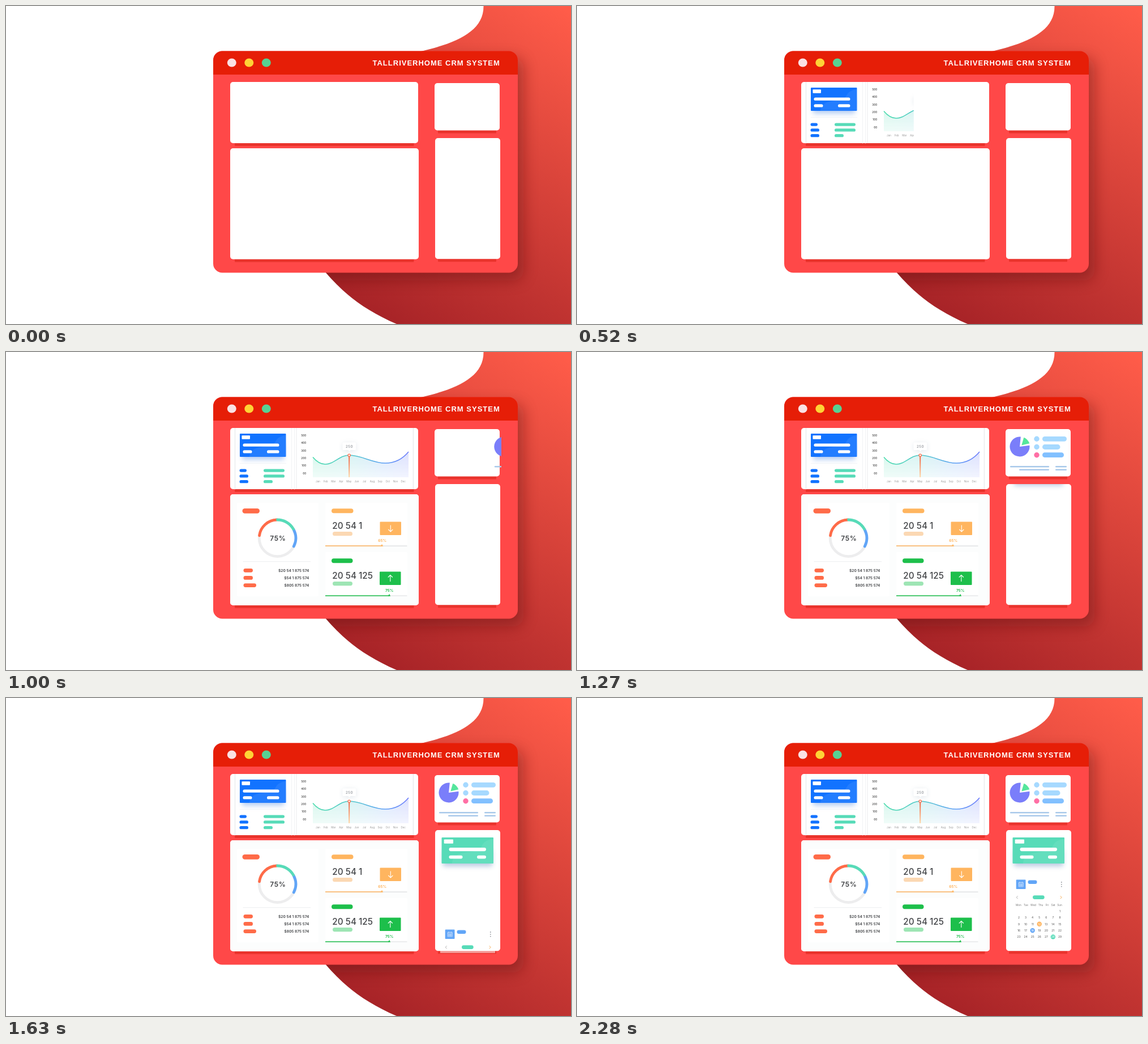
Write an HTML page that moves like this. It is 998x561 px and loops after 2980 ms.

```html
<!DOCTYPE html>
<html lang="en">
<head>
<meta charset="utf-8">
<title>Dashboard</title>
<style>
html, body { margin: 0; width: 100%; height: 100%; overflow: hidden; background: #fff; }
svg { display: block; width: 998px; height: 561px; }
text { font-family: Inter, "Open Sans", sans-serif; white-space: pre; }
</style>
</head>
<body>
<svg viewBox="0 0 998 561" xmlns="http://www.w3.org/2000/svg">
  <defs>
    <linearGradient id="red" gradientUnits="userSpaceOnUse" x1="980" y1="0" x2="640" y2="540">
      <stop offset="0" stop-color="#ff5c49"/><stop offset="1" stop-color="#a72327"/>
    </linearGradient>
    <linearGradient id="stroke" gradientUnits="userSpaceOnUse" x1="542" y1="0" x2="711" y2="0">
      <stop offset="0" stop-color="#4edcae"/><stop offset=".45" stop-color="#52c4cf"/>
      <stop offset=".75" stop-color="#5a9df5"/><stop offset="1" stop-color="#6f7dfa"/>
    </linearGradient>
    <linearGradient id="fade" x1="0" y1="0" x2="0" y2="1">
      <stop offset="0" stop-color="#fff"/><stop offset="1" stop-color="#fff" stop-opacity=".35"/>
    </linearGradient>
    <linearGradient id="stem" gradientUnits="userSpaceOnUse" x1="0" y1="184" x2="0" y2="221">
      <stop offset="0" stop-color="#f2603f"/><stop offset="1" stop-color="#ffd9a8"/>
    </linearGradient>
    <filter id="soft" x="-30%" y="-60%" width="160%" height="220%"><feGaussianBlur stdDeviation="4"/></filter>
    <filter id="wide" x="-20%" y="-20%" width="140%" height="140%"><feGaussianBlur stdDeviation="13"/></filter>
    <mask id="areaMask"><rect x="540" y="174" width="174" height="48" fill="url(#fade)"/></mask>
    <clipPath id="blobClip"><use href="#blob"/></clipPath>
    <clipPath id="topClip"><rect x="396" y="134" width="332" height="108.5" rx="5"/></clipPath>
    <clipPath id="wipeClip"><rect id="wipe" x="510" y="134" width="0" height="108"/></clipPath>
    <clipPath id="pieClip"><rect x="757" y="136" width="118" height="84"/></clipPath>
    <clipPath id="sideClip"><rect x="758" y="233" width="115" height="217"/></clipPath>
  </defs>
  <path id="blob" fill="url(#red)" d="M843.500 0C844 44 797 65 733 80L540 300L565 470.500C597 508 634 537 690 561H998V0Z"/>
  <g clip-path="url(#blobClip)">
    <rect x="376" y="92" width="538" height="392" rx="16" fill="#5a0808" opacity=".4" filter="url(#wide)"/>
  </g>
  <g id="shell"></g>
  <g clip-path="url(#topClip)"><g id="wallet"></g></g>
  <g clip-path="url(#wipeClip)"><g id="chart"></g></g>
  <g id="stats"></g>
  <g clip-path="url(#pieClip)"><g id="pie"></g></g>
  <g clip-path="url(#sideClip)"><g id="pass"></g><g id="calendar"></g></g>
</svg>
<script>
const $ = id => document.getElementById(id);
const ORANGE = '#ff6b48', AMBER = '#ffb55f', MINT = '#57dbb8', BLUE = '#61a5f7', GREEN = '#1dbf4b';

// Shape helpers; boxes are given by their edges.
const box = (x1, y1, x2, y2, fill, r = 0, more = '') =>
  `<rect x="${x1}" y="${y1}" width="${x2 - x1}" height="${y2 - y1}" rx="${r}" fill="${fill}" ${more}/>`;
const pill = (x1, y1, x2, y2, fill) => box(x1, y1, x2, y2, fill, (y2 - y1) / 2);
const disc = (x, y, r, fill, more = '') => `<circle cx="${x}" cy="${y}" r="${r}" fill="${fill}" ${more}/>`;
const line = (d, color, w, more = '') => `<path d="${d}" fill="none" stroke="${color}" stroke-width="${w}" ${more}/>`;
const label = (s, x, y, size, fill, weight = 400, anchor = 'middle', more = '') =>
  `<text x="${x}" y="${y}" font-size="${size}" fill="${fill}" font-weight="${weight}" text-anchor="${anchor}" ${more}>${s}</text>`;

function arc(cx, cy, r, from, to) {
  const at = deg => {
    const a = (deg - 90) * Math.PI / 180;
    return `${cx + r * Math.cos(a)} ${cy + r * Math.sin(a)}`;
  };
  return `M${at(from)}A${r} ${r} 0 ${to - from > 180 ? 1 : 0} 1 ${at(to)}`;
}

function panel(x1, y1, x2, y2, s1, s2) {
  return box(s1, y2 - 3, s2, y2 + 5, '#e9332c', 1) + box(x1, y1, x2, y2, '#fff', 5);
}

function drawShell() {
  const dots = ['#fae1e3', '#ffd336', '#57d193'];
  return box(366, 79.5, 904, 470.5, '#ff4848', 16) +
    '<path d="M366 121V95.500a16 16 0 0 1 16-16H888a16 16 0 0 1 16 16V121Z" fill="#e61e07"/>' +
    dots.map((c, i) => `<ellipse cx="${398.800 + i * 30.500}" cy="100" rx="8" ry="7.500" fill="${c}"/>`).join('') +
    label('TALLRIVERHOME CRM SYSTEM', 647.5, 105.3, 13, '#fff', 700, 'start',
      'letter-spacing="1" style="font-family:\'Liberation Sans\',Arial,sans-serif"') +
    panel(396, 134, 728, 242, 404, 720.5) +
    panel(396, 251, 729, 446.7, 404, 720.5) +
    panel(757, 136, 872, 219.5, 763, 866) +
    panel(758, 233, 873, 446.3, 763, 866);
}

function drawWallet() {
  const rows = [[425, 492], [428, 492], [428, 471]];
  return line('M404.500 134V243', '#dcdfe2', .8) +
    line('M504.500 134V243M509.500 134V243', '#f1f2f4', 1) +
    box(417, 162, 491, 190, '#6f9fe8', 3, 'opacity=".5" filter="url(#soft)"') +
    line('M413 196.500H495', '#f0f2f5', .8) +
    box(413, 144, 494.5, 185, '#1273ff', 1) +
    '<path d="M430 185C432 160 470 172 476 158C480 150 487 148 494.500 147V185Z" fill="#fff" opacity=".07"/>' +
    box(416.5, 147.3, 431, 153.7, '#fff', 1) +
    pill(418.5, 161.5, 482.5, 166.8, '#fff') +
    pill(418.5, 173.3, 434.5, 178.5, '#fff') + pill(461, 173.3, 482.5, 178.5, '#fff') +
    rows.map(([a, b], i) => {
      const y = 206.5 + i * 9.8;
      return pill(412.5, y, a, y + 5.2, '#1273ff') + pill(455, y, b, y + 5.2, MINT);
    }).join('');
}

function drawChart() {
  const months = 'Jan Feb Mar Apr May Jun Jul Aug Sep Oct Nov Dec'.split(' ');
  const curve = 'M542 185.500C549 194 556 198 564 198C580 198 589 182 606 182C628 182 647 196 670 196C690 196 702 187 711 176';
  return line('M513 134V242', '#e5e6e8', .8) + line('M719.300 134V242', '#dcdee0', .8) +
    ['500', '400', '300', '200', '100', '00'].map((s, i) =>
      label(s, 530.3, 149 + i * 13.35, 4.7, '#333', 500, 'end')).join('') +
    `<path d="${curve}V221H542Z" fill="url(#stroke)" opacity=".24" mask="url(#areaMask)"/>` +
    line('M606.200 184V221', 'url(#stem)', 2) +
    line(curve, 'url(#stroke)', 1.6) +
    disc(606.2, 182.2, 2.1, '#fff', `stroke="${ORANGE}" stroke-width="1.300"`) +
    box(595, 161, 618, 175, '#8fa4b8', 2, 'opacity=".25" filter="url(#soft)"') +
    box(594.5, 159.5, 618, 173, '#fff', 1.5) + '<path d="M604 172.500h5l-2.500 3z" fill="#fff"/>' +
    label('250', 606.5, 169, 6, '#a5a8ad', 700, 'middle', 'letter-spacing=".400"') +
    months.map((m, i) => label(m, 551 + i * 13.7, 230.4, 4.5, '#999')).join('');
}

function drawCounter(y, c) {
  const { color, pale, value, share, at, left, arrow } = c;
  const mid = left + 18.8;
  const tip = arrow > 0 ? y + 40.7 : y + 29.3;
  return pill(575, y, c.end, y + 8, color) +
    label(value, 576.3, y + 35.6, 15.3, '#424447', 500, 'start') +
    pill(577, y + 40.8, 612, y + 48, pale) +
    box(left, y + 23.2, left + 37.5, y + 46.8, color, 1) +
    line(`M${mid} ${y + 29.200}V${y + 40.800}M${mid - 4} ${tip - arrow * 4}L${mid} ${tip}L${mid + 4} ${tip - arrow * 4}`, '#fff', 1.1) +
    label(share, c.shareX, y + 58.5, 6.5, color, 700) +
    line(`M564 ${y + 65.800}H708.500`, '#d9dbdd', 1.2) + line(`M564 ${y + 65.800}H${at}`, color, 1.5) +
    `<path d="M${at - 2.200} ${y + 66.500}l2.200-4 2.200 4z" fill="${color}"/>`;
}

function drawStats() {
  const ring = [[-82, -2, ORANGE], [62, 117, BLUE], [0, 60, MINT]];
  const sums = [[436, '$20 54 1 875 574'], [436, '$54 1 875 574'], [442, '$805 875 574']];
  return box(396, 251, 729, 446.7, '#fcfdfd', 5) +
    box(408, 266, 551.5, 431, '#fff', 2) + box(564, 266, 709, 343, '#fff', 2) + box(564, 353, 709, 431, '#fff', 2) +
    pill(417.5, 276, 448, 284.7, ORANGE) +
    disc(479.5, 328.3, 32.3, 'none', 'stroke="#ededee" stroke-width="4.800"') +
    ring.map(([a, b, c]) => line(arc(479.5, 328.3, 32.3, a, b), c, 4.8, 'stroke-linecap="round"')).join('') +
    label('75%', 480.3, 332.6, 12, '#3f4144', 600, 'middle', 'letter-spacing=".700"') +
    line('M418.500 369.700H538', '#e6e8ea', .8) +
    sums.map(([end, s], i) => {
      const y = 382 + i * 13.1;
      return pill(419.5, y, end, y + 6.7, ORANGE) + label(s, 535.5, y + 5.7, 6.6, '#3f4144', 600, 'end');
    }).join('') +
    drawCounter(276.3, { color: AMBER, pale: '#fbd8b3', value: '20 54 1', share: '65%', shareX: 664.7, at: 664, left: 660.5, end: 613.5, arrow: 1 }) +
    drawCounter(364.2, { color: GREEN, pale: '#9ee5b4', value: '20 54 125', share: '75%', shareX: 677.2, at: 677, left: 660, end: 612.5, arrow: -1 });
}

function drawPie() {
  const sky = '#a6d9ff', bars = [[865, sky, sky], [853.5, sky, sky], [860, '#82c0ff', '#ff6fa5']];
  const rules = [[765, 834, 202.3], [845, 865, 202.3], [781, 834, 207.8], [845, 865, 207.8]];
  return `<path d="${arc(782, 167, 17.5, 83, 366)}L782 167Z" fill="#7a7efa"/>` +
    '<path d="M785.300 164.500L789.300 150.800Q796.500 154 799.300 161.300Z" fill="#55e69c"/>' +
    bars.map(([end, c, dot], i) => {
      const y = 153.3 + i * 14.2;
      return disc(812, y, 4.7, dot) + pill(822, y - 4.4, end, y + 4.4, c);
    }).join('') +
    rules.map(([a, b, y]) => pill(a, y - 1.3, b, y + 1.3, '#a9c9ea')).join('');
}

function drawPass() {
  return box(772, 268, 859, 297, '#7898c4', 3, 'opacity=".5" filter="url(#soft)"') +
    box(769.5, 246, 861, 292, MINT, 1) +
    '<path d="M788 292C790 264 832 278 840 262C844 252 852 250 861 249V292Z" fill="#fff" opacity=".07"/>' +
    box(773.7, 249.5, 790, 256.7, '#fff', 1) +
    pill(782.5, 264, 848, 270.2, '#fff') +
    pill(782.5, 277.7, 806.5, 283.4, '#fff') + pill(832, 277.7, 848, 283.4, '#fff');
}

function drawCalendar() {
  const days = 'Mon Tue Wed Thu Fri Sat Sun'.split(' ');
  const dayX = [780, 793, 806, 819, 830.5, 841, 852.5];
  const marks = { 12: AMBER, 18: BLUE, 28: MINT };
  let s = box(767, 311, 864, 434, '#fff', 2, 'opacity=".5"') +
    box(775.7, 320.5, 792.5, 337, BLUE, 1) +
    line('M780.200 325.500H788.200V332.800H780.200ZM780.200 327.800H788.200M782.200 324V326M786.200 324V326M782.900 328V332.500M785.500 328V332.500M780.500 330.300H788', '#e8f2ff', .7) +
    pill(796.5, 321.5, 812.5, 328, BLUE) +
    [325, 328.8, 332.6].map(y => disc(855.8, y, .9, '#8c9096')).join('') +
    line('M778.500 349.200L776.300 351.700L778.500 354.200', '#999', .8) +
    line('M853.800 349.200L856 351.700L853.800 354.200', '#f5a03c', .9) +
    pill(805, 348.2, 825.7, 355, MINT) +
    days.map((d, i) => label(d, dayX[i], 367.2, 4.7, '#777')).join('');
  for (let d = 1; d <= 29; d++) {
    const x = 780.5 + (d + 5) % 7 * 12.07, y = 376.2 + Math.floor((d + 5) / 7) * 11.3;
    if (marks[d]) s += disc(x, y, 4.2, marks[d]);
    s += label(d, x, y + 1.7, 4.8, marks[d] ? '#fff' : '#666', 500);
  }
  return s;
}

const parts = { shell: drawShell, wallet: drawWallet, chart: drawChart, stats: drawStats, pie: drawPie, pass: drawPass, calendar: drawCalendar };
for (const id in parts) $(id).innerHTML = parts[id]();

const LOOP = 2980, STEP = 30, LEAD = 130;
const ramp = (t, from, to) => Math.min(1, Math.max(0, (t - from) / (to - from)));

function slide(id, p, dx, dy) {
  $(id).setAttribute('transform', `translate(${dx * (1 - p)} ${dy * (1 - p)})`);
  $(id).style.visibility = p > 0 ? 'visible' : 'hidden';
}

function render(now) {
  let t = now % LOOP;
  t = t < LEAD ? 0 : LEAD + Math.floor((t - LEAD) / STEP) * STEP;
  slide('wallet', ramp(t, 100, 370), 0, 112);
  $('wipe').setAttribute('width', 212 * ramp(t, 400, 700));
  $('stats').style.opacity = 1 - (1 - ramp(t, 700, 970)) ** 2;
  slide('pie', ramp(t, 970, 1240), 110, 0);
  slide('pass', ramp(t, 1240, 1510), 0, -69);
  slide('calendar', ramp(t, 1540, 1810), 0, 132);
}

const start = performance.now();
function tick() {
  render(performance.now() - start);
  requestAnimationFrame(tick);
}
tick();
</script>
</body>
</html>
```
